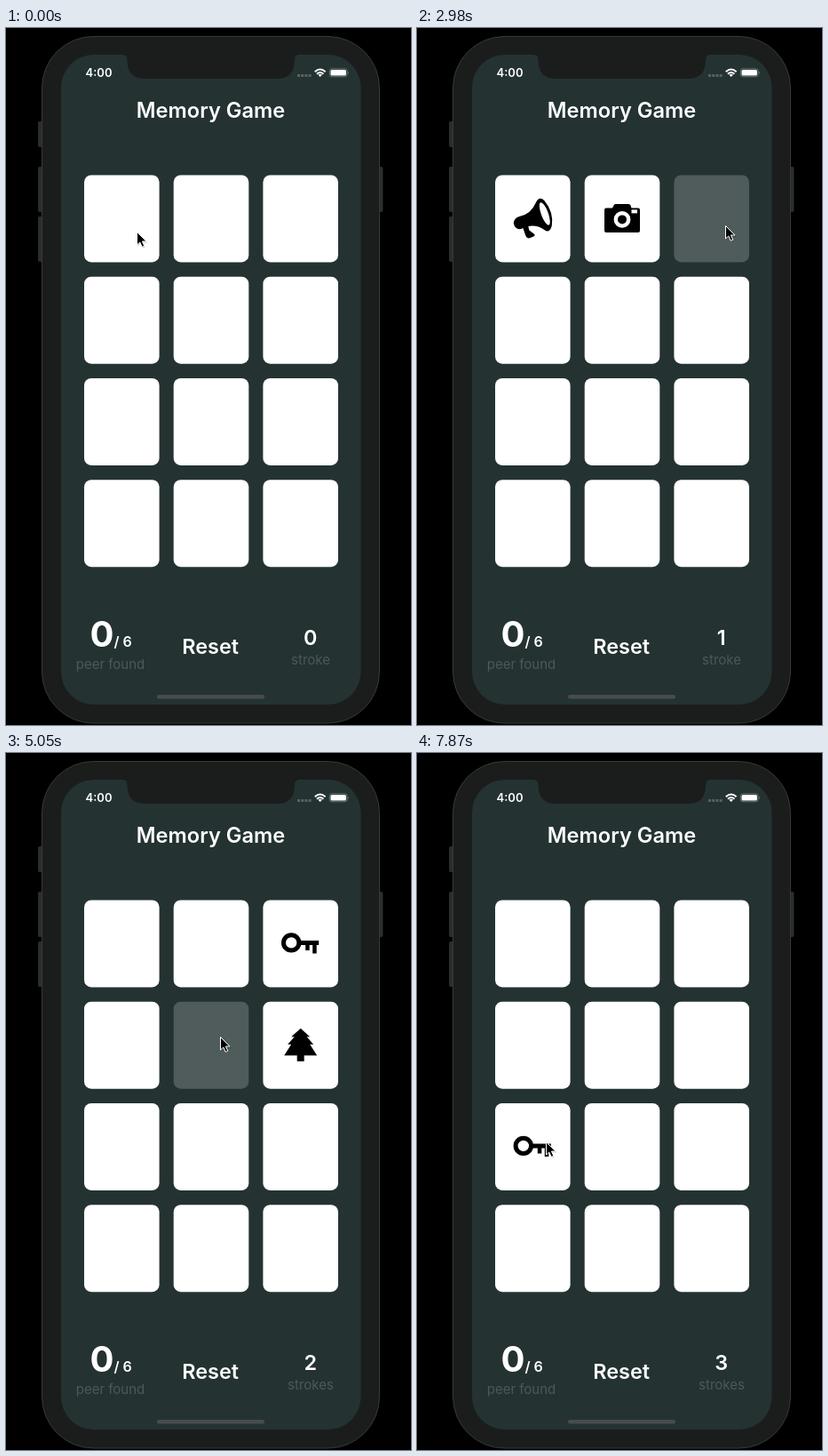
These frames come from a looping animation (456x784 px, 8000 ms). An HTML page:

```html
<!DOCTYPE html>
<html lang="en">
<head>
<meta charset="utf-8">
<title>Memory Game</title>
<style>
  html, body { margin: 0; width: 100%; height: 100%; overflow: hidden; background: #000; }
  svg { display: block; width: 456px; height: 784px; }
  text { font-family: Inter, Roboto, sans-serif; font-weight: 600; fill: #fff; }
  .mid { text-anchor: middle; }
  .label { font-size: 15px; font-weight: 400; fill: #4c5959; }
</style>
</head>
<body>
<svg viewBox="0 0 456 784">
  <defs>
    <g id="megaphone">
      <path d="M-21.500 5Q-21-1-15-2.500Q-2-5 3.500-18Q7-26 13-20.500Q24-7 21.500 8Q19 17 13 12.500Q5 7-5 8.500L-4 13L2 17.500Q3 19 1 20L-4 22Q-7 22-8 19L-11 10.500Q-15 13-18.500 10.500Q-21 9-21.500 5Z"/>
      <ellipse cx="13.500" cy="-5.500" rx="4" ry="13.500" transform="rotate(-20 13.500 -5.500)" fill="#fff"/>
    </g>
    <g id="camera">
      <path d="M-18-12H-11L-9.500-15Q-9-16.500-7.500-16.500H7Q9-16.500 9.500-15L10.500-12H18Q20-12 20-10V13.500Q20 15.500 18 15.500H-18Q-20 15.500-20 13.500V-10Q-20-12-18-12Z"/>
      <circle cy="1" r="7.200" fill="none" stroke="#fff" stroke-width="4.400"/>
      <path d="M10.500-10H17V-6H10.500Z" fill="#fff"/>
    </g>
    <g id="key">
      <circle cx="-10.500" cy="-1" r="8.700" fill="none" stroke="#000" stroke-width="5"/>
      <path d="M-1-3.500H20.500V1.500H18V11H13.500V1.500H10V7.500H5.500V1.500H-1Z"/>
    </g>
    <path id="tree" d="M0-19L10.500-9.500H7L14.500-1H10.500L18.500 11.500H4V18H-4V11.500H-18.500L-10.500-1H-14.500L-7-9.500H-10.500Z"/>
    <g id="headphones">
      <path d="M-20.500 8Q-22-19 0-19Q22-19 20.500 8" fill="none" stroke="#000" stroke-width="4.600"/>
      <path id="cup" d="M-22.500 1V8Q-22 11.500-17 11.500L-10 17.500Q-5 18-5 15V2Q-5 0-8 0Q-13 2-17 5L-19 1Z"/>
      <use href="#cup" transform="scale(-1 1)"/>
    </g>
    <path id="wrench" transform="rotate(-45)" fill="none" stroke="#000" stroke-width="3.300"
      d="M-10.300-3.300H10.300A8.500 8.500 0 0 1 24.900-5L17-3V3L24.900 5A8.500 8.500 0 0 1 10.300 3.300H-10.300A8.500 8.500 0 0 1-24.900 5L-17 3V-3L-24.900-5A8.500 8.500 0 0 1-10.300-3.300Z"/>
  </defs>

  <rect width="456" height="784"/>
  <g fill="#2b2c2c" stroke="#3a3b3b" stroke-width=".6">
    <rect x="36.500" y="105.500" width="6" height="28" rx="1"/>
    <rect x="36.500" y="156.500" width="6" height="50" rx="1"/>
    <rect x="36.500" y="212.500" width="6" height="50" rx="1"/>
    <rect x="418" y="156.500" width="6" height="50" rx="1"/>
  </g>
  <rect x="40.500" y="9.500" width="380" height="772.500" rx="58" fill="#1b1d1d" stroke="#373939"/>
  <rect x="62" y="30" width="337.500" height="731" rx="37" fill="#243232"/>
  <path d="M131 29.500V30Q136.500 30 136.500 36Q136.500 57 156 57H305Q325 57 325 36Q325 30 330 30V29.500Z" fill="#1b1d1d"/>

  <text x="89.500" y="55" font-size="13">4:00</text>
  <path d="M328 53.500H344" stroke="#566262" stroke-width="3" stroke-dasharray="3 1.200"/>
  <g fill="none" stroke="#fff" stroke-width="2">
    <path d="M347.800 49.300Q353.700 43.700 359.600 49.300M350 51.700Q353.700 48.300 357.400 51.700"/>
    <path d="M351.500 52.700Q353.700 51 355.900 52.700L353.700 55Z" fill="#fff" stroke="none"/>
  </g>
  <rect x="364.300" y="45.800" width="19.800" height="9" rx="2.600" fill="none" stroke="#7b8585" stroke-width=".8"/>
  <rect x="365.500" y="47" width="17.400" height="6.600" rx="1.500" fill="#fff"/>
  <path d="M385.200 48.700Q386.700 50.300 385.200 51.900Z" fill="#7b8585"/>

  <text class="mid" x="230.500" y="101" font-size="23.600">Memory Game</text>
  <g id="board"></g>
  <text class="mid" x="108" y="696" font-size="40" style="font-weight:700">0</text>
  <text x="121.500" y="696" font-size="16">/ 6</text>
  <text class="mid label" x="117.500" y="721">peer found</text>
  <text class="mid" x="230.200" y="704" font-size="23.400">Reset</text>
  <text class="mid" id="count" x="342.700" y="694" font-size="23.400"></text>
  <text class="mid label" id="unit" x="343" y="716"></text>
  <rect x="170" y="750" width="121" height="4.500" rx="2.250" fill="#484c4c"/>

  <g id="cursor">
    <path d="M1 1.500V16.500L4.500 13.500L7 18.500L9.500 17.500L7.500 12.500H12.500Z" opacity=".2"/>
    <path d="M.500 .500V15L3.800 12L6.200 17.300L8.800 16.200L6.400 11H11Z" stroke="#fff" stroke-width="1"/>
  </g>
</svg>
<script>
const LOOP = 8000, STEP = 150;

// Each tap dims its card, then reveals the icon; a slow fade takes one extra step.
const taps = [
  { card: 0, icon: 'megaphone', down: 590, slow: true },
  { card: 1, icon: 'camera', down: 1480, slow: true },
  { card: 2, icon: 'key', down: 2980, slow: true },
  { card: 5, icon: 'tree', down: 3720, slow: true },
  { card: 4, icon: 'headphones', down: 5050 },
  { card: 3, icon: 'wrench', down: 5940 },
  { card: 6, icon: 'key', down: 7570, slow: true }
];

const pointer = [
  [0, 147, 229], [890, 190, 226], [1040, 227, 222],
  [2080, 255, 222], [2230, 318, 222], [2380, 347, 222],
  [3280, 345, 262], [3420, 340, 314],
  [4310, 322, 315], [4460, 270, 318], [4600, 241, 319],
  [5490, 190, 319], [5640, 147, 319],
  [6830, 144, 363], [6980, 140, 398], [7130, 142, 428], [7280, 145, 437]
];

const byId = id => document.getElementById(id);

function add(parent, tag, attrs) {
  const node = document.createElementNS('http://www.w3.org/2000/svg', tag);
  for (const name in attrs) node.setAttribute(name, attrs[name]);
  return parent.appendChild(node);
}

const cards = Array.from({ length: 12 }, (_, i) => {
  const x = 130.3 + (i % 3) * 100.7;
  const y = 214.4 + Math.floor(i / 3) * 114.25;
  const group = add(byId('board'), 'g', { transform: `translate(${x} ${y})` });
  add(group, 'rect', { x: -42.3, y: -49, width: 84.6, height: 98, rx: 8, fill: '#fff' });
  return group;
});

for (const tap of taps) {
  tap.node = add(cards[tap.card], 'use', { href: '#' + tap.icon });
}

function tapOpacity({ down, slow }, t) {
  const age = t - down;
  if (age < 0 || age >= 2 * STEP - 10) return 1;
  if (age < STEP) return 0.2;
  return slow ? 0.85 : 1;
}

function draw(t) {
  const released = taps.filter(tap => t >= tap.down + STEP).length;
  const firstOpen = Math.floor((released - 1) / 2) * 2;
  taps.forEach((tap, i) => {
    const open = i >= firstOpen && i < released;
    tap.node.style.display = open ? '' : 'none';
    cards[tap.card].style.opacity = tapOpacity(tap, t);
  });

  const strokes = Math.floor(released / 2);
  byId('count').textContent = strokes;
  byId('unit').textContent = strokes > 1 ? 'strokes' : 'stroke';

  const [, x, y] = pointer.filter(key => key[0] <= t).pop();
  byId('cursor').setAttribute('transform', `translate(${x} ${y})`);
}

const start = performance.now();
function tick() {
  draw((performance.now() - start) % LOOP);
  requestAnimationFrame(tick);
}
tick();
</script>
</body>
</html>
```
